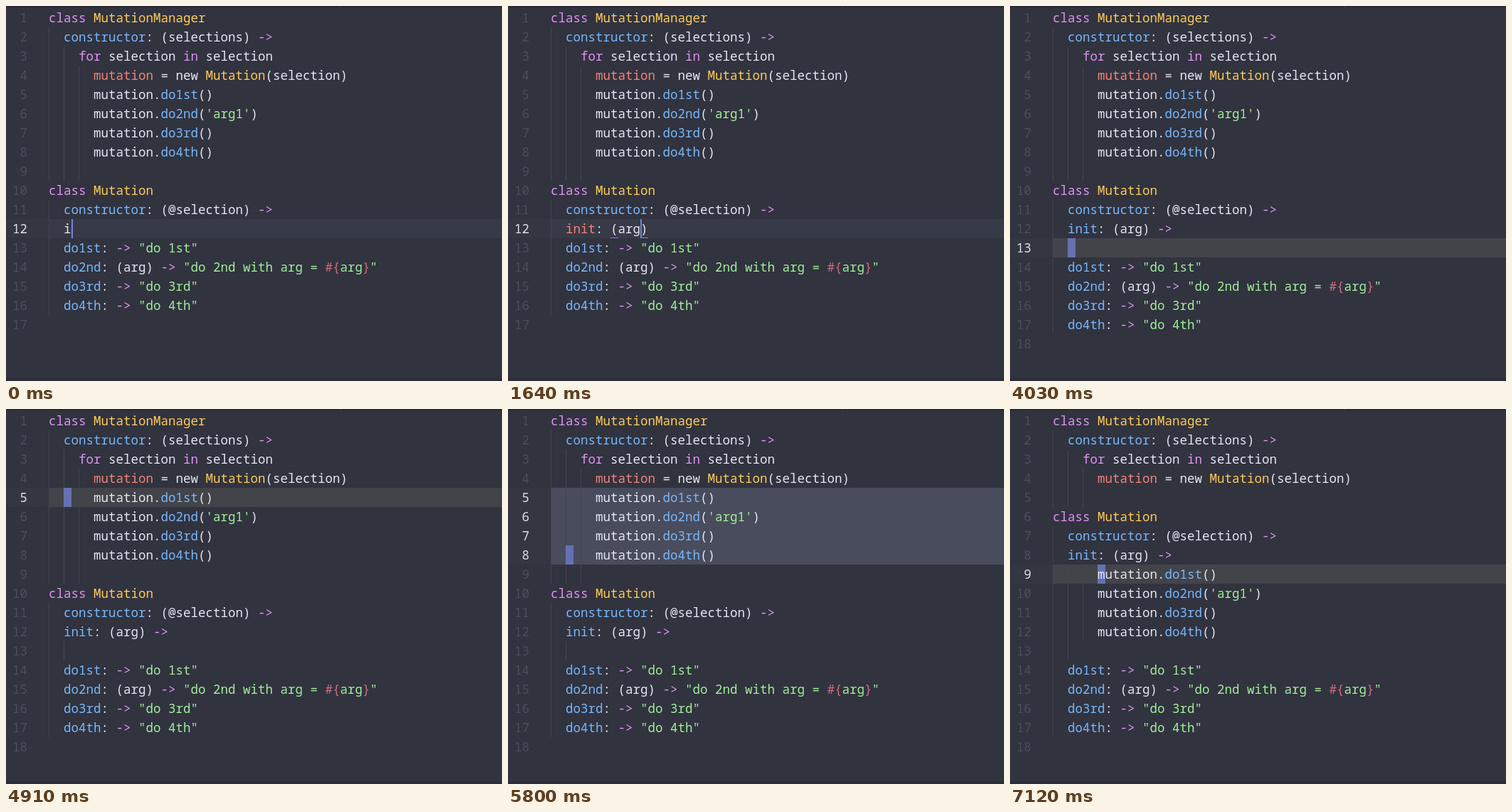
An HTML page that plays this animation: 697x528 px, repeating every 8 s.

```html
<!DOCTYPE html>
<html lang="en">
<head>
<meta charset="utf-8">
<title>Editor session</title>
<style>
  html, body { margin: 0; width: 100%; height: 100%; overflow: hidden; background: #31333f; }
  #stage {
    position: relative; width: 697px; height: 528px; overflow: hidden;
    background: #31333f; color: #e4e6f3;
    font: 17.5px/27px "Noto Sans Mono", "DejaVu Sans Mono", monospace;
    font-variant-ligatures: none;
  }
  #stage i { position: absolute; display: block; }
  .row { position: absolute; left: 0; width: 697px; height: 27px; white-space: pre; }
  .num { position: absolute; left: 0; width: 30px; text-align: right; color: #4b4e5b; }
  .code { position: absolute; left: 60px; }
  .active .num { color: #dcdee8; }
  .band { left: 60px; right: 0; height: 27px; }
  .side { left: 0; width: 60px; height: 27px; background: #343642; }
  .insert .band { background: #373a47; }
  .normal .band { background: #424449; }
  .visual .band { background: #494c5c; }
  .guide { width: 1px; height: 27px; background: #434651; }
  .bar { width: 2px; height: 27px; background: #7482e6; }
  .block { width: 11px; height: 27px; background: #6671b2; }
  .pair { width: 10.5px; height: 1px; top: 26px; background: #7482e6; }
  .key { color: #de92f1; }
  .type { color: #fdcb59; }
  .str { color: #a2ee9a; }
  .fn { color: #78b7fa; }
  .name { color: #f58374; }
  .mark { color: #cf6d7c; }
  .top { left: 0; top: 0; width: 697px; height: 2px; background: #272932; }
  .tab { left: 470px; top: 0; width: 1px; height: 2px; background: #3b3e4a; }
  .foot { left: 0; top: 524px; width: 697px; height: 4px; background: #2b2d38; }
</style>
</head>
<body>
<div id="stage"><div id="rows"></div><i class="top"></i><i class="tab"></i><i class="foot"></i></div>
<script>
const LOOP = 8000, ROW = 27, TOP = 3, CHAR = 10.5;

const head = [
  'class MutationManager',
  '  constructor: (selections) ->',
  '    for selection in selection',
  '      mutation = new Mutation(selection)'
];
const calls = ['do1st()', 'do2nd(\'arg1\')', 'do3rd()', 'do4th()'].map(c => '      mutation.' + c);
const gap = '      ';
const second = ['class Mutation', '  constructor: (@selection) ->'];
const methods = [
  '  do1st: -> "do 1st"',
  '  do2nd: (arg) -> "do 2nd with arg = #{arg}"',
  '  do3rd: -> "do 3rd"',
  '  do4th: -> "do 4th"',
  ''
];

const typed = (init, ...extra) => [...head, ...calls, gap, ...second, '  ' + init, ...extra, ...methods];
const full = typed('init: (arg) ->', '    ');
const cut = full.filter((_, i) => i < 4 || i > 7);
const pasted = [...cut.slice(0, 8), ...calls, ...cut.slice(8)];

// Each step: time, lines, cursor row, cursor column, mode, options
const steps = [];
const type = (time, text, col = text.length + 2, opts) =>
  steps.push([time, typed(text), 12, col, 'insert', opts]);

type(0, 'i');
type(140, 'in');
type(290, 'ini');
type(440, 'init');
type(740, 'init:');
type(890, 'init: ');
['', 'a', 'ar', 'arg'].forEach((arg, i) =>
  type(1190 + i * 150, `init: (${arg})`, 9 + i, { pair: [8, 9 + i] }));
type(1940, 'init: (arg)', 13, { pair: [8, 12] });
type(2090, 'init: (arg) ');
type(2230, 'init: (arg) -');
type(2380, 'init: (arg) ->', 16, { stale: true });
type(2530, 'init: (arg) ->');
steps.push(
  [2980, typed('init: (arg) ->', '  '), 13, 2, 'insert'],
  [3130, full, 13, 4, 'insert'],
  [3580, full, 13, 4, 'insert', { hidden: true }],
  [4030, full, 13, 2, 'normal'],
  [4480, full, 11, 2, 'normal'],
  [4630, full, 9, 2, 'normal'],
  [4770, full, 7, 2, 'normal'],
  [4910, full, 5, 2, 'normal'],
  [5360, full, 5, 2, 'visual', { from: 5 }],
  [5510, full, 6, 2, 'visual', { from: 5 }],
  [5650, full, 7, 2, 'visual', { from: 5 }],
  [5800, full, 8, 2, 'visual', { from: 5 }],
  [6090, cut, 5, 0, 'normal'],
  [6540, cut, 6, 0, 'normal'],
  [6690, cut, 7, 0, 'normal'],
  [6830, cut, 8, 0, 'normal'],
  [7120, pasted, 9, 6, 'normal']
);

const TOKEN = /(?<key>\b(?:class|for|in)\b|->)|(?<type>\b[A-Z]\w+)|(?<str>'[^']*'|"[^"]*")|(?<fn>\w+(?=:.*->)|(?<=\.)\w+)|(?<name>\w+(?=:| =))/g;
const escape = s => s.replace(/>/g, '&gt;');
const span = (cls, text) => `<span class="${cls}">${text}</span>`;

function paint(line, stale) {
  let html = '', end = 0;
  for (const m of line.matchAll(TOKEN)) {
    let kind = Object.keys(m.groups).find(k => m.groups[k] !== undefined);
    let text = escape(m[0]);
    if (kind === 'fn' && stale) kind = 'name';
    if (kind === 'str') text = text.replace(/#\{|\}/g, s => span('mark', s));
    html += escape(line.slice(end, m.index)) + span(kind, text);
    end = m.index + m[0].length;
  }
  return html + escape(line.slice(end));
}

const box = (cls, col) => `<i class="${cls}" style="left:${60 + col * CHAR}px"></i>`;

function render([, lines, row, col, mode, opts = {}]) {
  const { pair = [], stale, hidden, from = row } = opts;
  return lines.map((line, i) => {
    const n = i + 1, here = n === row, active = n >= from && n <= row;
    let html = active ? '<i class="side"></i><i class="band"></i>' : '';
    const indent = line.match(/^ */)[0].length;
    for (let g = 0; g < indent; g += 2) html += box('guide', g);
    if (here && mode !== 'insert') html += box('block', col);
    html += span('num', n) + span('code', paint(line, here && stale));
    if (here && mode === 'insert' && !hidden) html += box('bar', col);
    if (here) html += pair.map(c => box('pair', c)).join('');
    const cls = active ? `row active ${mode}` : 'row';
    return `<div class="${cls}" style="top:${TOP + i * ROW}px">${html}</div>`;
  }).join('');
}

const rows = document.getElementById('rows');
const start = performance.now();
let shown = null;

function tick() {
  const t = (performance.now() - start) % LOOP;
  const step = steps.findLast(s => s[0] <= t) || steps[0];
  if (step !== shown) {
    rows.innerHTML = render(step);
    shown = step;
  }
  requestAnimationFrame(tick);
}
tick();
</script>
</body>
</html>
```
